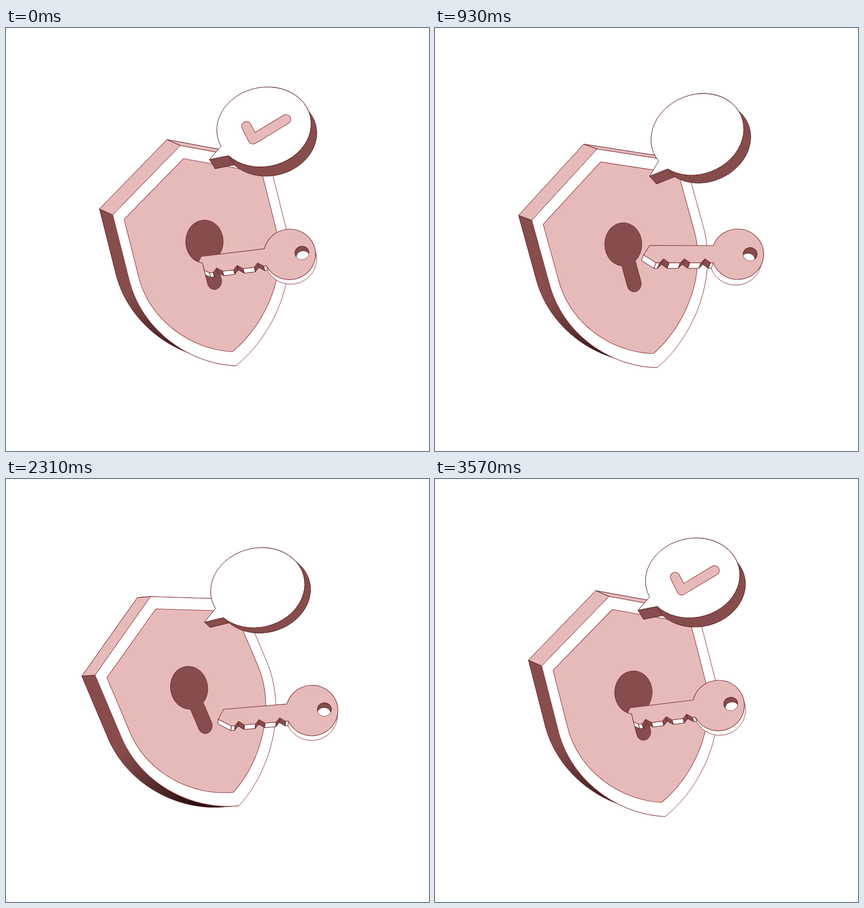
An HTML page with a canvas that plays this animation: 748 px wide and 748 px high, repeating every 3.6 s.

```html
<!DOCTYPE html>
<html lang="en">
<head>
<meta charset="utf-8">
<title>Shield and key</title>
<style>
  html, body { margin: 0; height: 100%; overflow: hidden; background: #fff; }
  canvas { display: block; }
</style>
</head>
<body>
<canvas id="stage" width="748" height="748"></canvas>
<script>
const ctx = document.getElementById('stage').getContext('2d');
const LOOP = 3600, STEP = 30, RAD = Math.PI / 180;
const PINK = '#e7baba', DARK = '#874c4c', WHITE = '#fff';
const LINE = '#98454a', EDGE = '#5c2326';

// ---- geometry helpers ----
function arc(cx, cy, rx, ry, from, to, tilt = 0) {
  const pts = [], n = 48, c = Math.cos(tilt * RAD), s = Math.sin(tilt * RAD);
  for (let i = 0; i <= n; i++) {
    const a = (from + (to - from) * i / n) * RAD;
    const x = rx * Math.cos(a), y = ry * Math.sin(a);
    pts.push([cx + x * c - y * s, cy + x * s + y * c]);
  }
  return pts;
}

function bezier(p0, p1, p2, p3, n = 40) {
  const at = (t, k) => (1 - t) ** 3 * p0[k] + 3 * t * (1 - t) ** 2 * p1[k]
    + 3 * t * t * (1 - t) * p2[k] + t ** 3 * p3[k];
  return Array.from({ length: n + 1 }, (_, i) => [at(i / n, 0), at(i / n, 1)]);
}

const mirror = pts => pts.map(([x, y]) => [-x, y]).reverse();

// Both return a function that maps local points to the stage.
const affine = ([ox, oy], [ux, uy], [vx, vy]) => pts =>
  pts.map(([x, y]) => [ox + x * ux + y * vx, oy + x * uy + y * vy]);

function turned(origin, degrees) {
  const c = Math.cos(degrees * RAD), s = Math.sin(degrees * RAD);
  return affine(origin, [c, -s], [s, c]);
}

// ---- drawing helpers ----
function trace(pts, close = true) {
  pts.forEach(([x, y], i) => i ? ctx.lineTo(x, y) : ctx.moveTo(x, y));
  if (close) ctx.closePath();
}

function poly(pts, fill, line = LINE, width = 1.1) {
  ctx.beginPath();
  trace(pts);
  ctx.fillStyle = fill;
  ctx.fill();
  ctx.strokeStyle = line;
  ctx.lineWidth = width;
  ctx.stroke();
}

const shift = (pts, [dx, dy]) => pts.map(([x, y]) => [x + dx, y + dy]);

function sweep(chain, depth, fill, line = EDGE) {
  poly([...chain, ...shift(chain, depth).reverse()], fill, line, 1);
}

// ---- shapes in local coordinates ----
const shieldTop = [0, -177];
const shieldLeft = [[-166, -98],
  ...bezier([-166, 22], [-166, 115], [-90, 199], [0, 229])];
const shieldFront = [shieldTop, ...shieldLeft, ...mirror(shieldLeft)];

const panelLeft = [[-146, -84],
  ...bezier([-146, 22], [-146, 105], [-76, 177], [0, 203])];
const panel = [[0, -153], ...panelLeft, ...mirror(panelLeft)];

const keyhole = [...arc(0, 0, 38, 38, 112.4, 427.6), ...arc(0, 73, 14.5, 14.5, 0, 180)];
const keyholeLeft = [...arc(0, 73, 14.5, 14.5, 90, 180), ...arc(0, 0, 38, 38, 112.4, 270)];
const rightHalf = [[0, -400], [500, -400], [500, 400], [0, 400]];

const bit = [[-166.5, 1], [-144.5, 15]];
for (let k = 0; k < 3; k++) {
  const x = -131 + 36.5 * k;
  bit.push([x - 7, 15], [x, 8], [x + 10, 15]);
}
bit.push([-43, 15]);
const keyFront = [[-155.5, -15.5], ...bit, ...arc(0, 0, 45.8, 44.6, 160, -160)];
const keyRing = arc(22, 0, 12.3, 11.7, 0, 360);

const tailTip = [-95.7, 58.6];
const bubbleFront = [tailTip, ...arc(0, 0, 84, 70, 165.9, 508.9, -13)];
const bubbleRim = arc(0, 0, 84, 70, -70, 148.9, -13);
const tick = [[-31, -1], [-19, 22], [39, -14]];
const tickLength = Math.hypot(12, 23) + Math.hypot(58, 36);

// ---- scene ----
function drawShield(wave) {
  const place = affine(
    [wave(334.2, 16.8, -.3), wave(375.7, 2, 6.9)],
    [wave(.805, .029, .016), wave(-.339, .057, .036)],
    [wave(.307, -.065, -.048), wave(.937, .022, .016)]);
  const depth = [-23.5, wave(-4.9, -5.7, -4.1)];
  const [light, deep] = place([[-170, 45], [-85, 190]]);
  const shade = ctx.createLinearGradient(...light, ...deep);
  shade.addColorStop(0, DARK);
  shade.addColorStop(1, '#2a0f11');

  sweep(place([shieldTop, [166, -98]]), depth, PINK);
  sweep(place(shieldLeft), depth, shade);
  sweep(place([shieldTop, shieldLeft[0]]), depth, PINK);
  poly(place(shieldFront), WHITE, LINE, 1);
  poly(place(panel), PINK);
  poly(place(keyhole), DARK, '#7a3c3f');
  return place;
}

function drawKey(wave, onShield) {
  const place = turned([wave(528.4, -26.9, 5.5), wave(403.9, -3.6, -4.1)],
    wave(3.95, 3.07, -3.75));
  const depth = [wave(-.9, 2.9, -2.7), wave(8.75, -.7, 1.2)];

  ctx.save();
  ctx.beginPath();
  trace(onShield(keyhole));
  trace(onShield(rightHalf));
  ctx.clip();

  sweep(place(arc(0, 0, 45.8, 44.6, 185, 240)), depth, DARK);
  sweep(place(arc(0, 0, 45.8, 44.6, -40, 170)), depth, WHITE, LINE);
  for (let i = 1; i < bit.length; i++) {
    const flat = Math.abs(bit[i][1] - bit[i - 1][1]) < 1 || i === 1;
    sweep(place([bit[i - 1], bit[i]]), depth, flat ? WHITE : DARK);
  }
  poly(place(keyFront), PINK, '#874144');

  const ring = place(keyRing);
  poly(ring, DARK, EDGE);
  ctx.save();
  ctx.beginPath();
  trace(ring);
  ctx.clip();
  poly(shift(ring, depth), WHITE, EDGE, 1);
  ctx.restore();
  ctx.restore();

  ctx.beginPath();
  trace(onShield(keyholeLeft), false);
  ctx.strokeStyle = '#7a3c3f';
  ctx.lineWidth = 1.1;
  ctx.stroke();
}

function drawTick(place, t) {
  const ease = u => (1 - Math.cos(Math.PI * Math.min(1, Math.max(0, u)))) / 2;
  const hiding = t < LOOP / 2;
  const from = hiding ? tickLength * ease(t / 640) : 0;
  const to = hiding ? tickLength : tickLength * ease((t - 2960) / 640);
  if (to - from < .05) return;

  ctx.save();
  ctx.lineCap = ctx.lineJoin = 'round';
  ctx.setLineDash([to - from, 999]);
  ctx.lineDashOffset = -from;
  ctx.beginPath();
  trace(place(tick), false);
  for (const [color, width] of [[LINE, 18], [PINK, 15.8]]) {
    ctx.strokeStyle = color;
    ctx.lineWidth = width;
    ctx.stroke();
  }
  ctx.restore();
}

function drawBubble(wave, t) {
  const place = turned([wave(454.1, 2, 10), wave(186.2, -11.2, 1.3)], wave(3.5, -4.1, 6));
  const depth = [wave(10.8, -.8, 1.4), wave(12.7, 3.6, 1.4)];
  sweep(place(bubbleRim), depth, DARK);
  sweep(place([tailTip, bubbleRim[bubbleRim.length - 1]]), depth, DARK);
  poly(place(bubbleFront), WHITE, EDGE, 1);
  drawTick(place, t);
}

function draw(now) {
  const t = Math.floor(now % LOOP / STEP) * STEP;
  const phase = 2 * Math.PI * t / LOOP;
  const wave = (mid, a, b) => mid + a * Math.cos(phase) + b * Math.sin(phase);

  ctx.fillStyle = WHITE;
  ctx.fillRect(0, 0, 748, 748);
  ctx.lineJoin = 'round';
  const onShield = drawShield(wave);
  drawKey(wave, onShield);
  drawBubble(wave, t);
}

let start;
function animate(now) {
  start ??= now;
  draw(now - start);
  requestAnimationFrame(animate);
}
requestAnimationFrame(animate);
</script>
</body>
</html>
```
